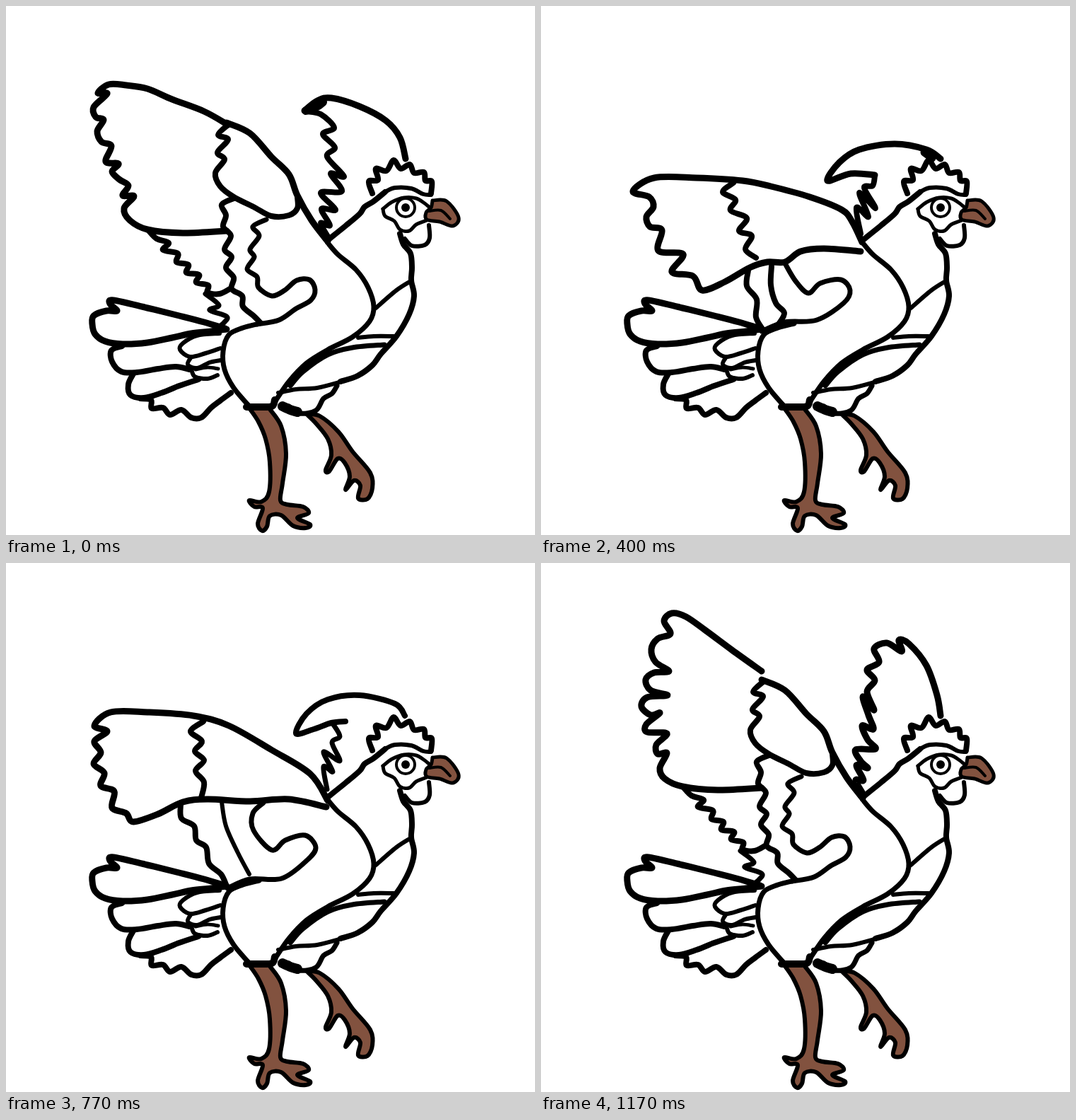
Recreate the animation shown at these times as an HTML page with a canvas. Size 748 by 748 pixels, loop 1.34 s.

```html
<!DOCTYPE html>
<html lang="en">
<head>
<meta charset="utf-8">
<title>Flapping bird</title>
<style>
html, body { margin: 0; width: 100%; height: 100%; overflow: hidden; background: #fff; }
canvas { display: block; width: 100vw; height: 100vh; }
</style>
</head>
<body>
<canvas id="stage" width="748" height="748"></canvas>
<script>
const ctx = document.getElementById('stage').getContext('2d');
const BROWN = '#82523f';

// Smooth curve through a few points
function curve(text) {
  const n = text.trim().split(/[\s,]+/).map(Number);
  const pts = [];
  for (let i = 0; i < n.length; i += 2) pts.push([n[i], n[i + 1]]);
  const path = new Path2D();
  path.moveTo(...pts[0]);
  for (let i = 0; i < pts.length - 1; i++) {
    const a = pts[i], b = pts[i + 1];
    const p = pts[i - 1] || a, q = pts[i + 2] || b;
    path.bezierCurveTo(
      a[0] + (b[0] - p[0]) / 6, a[1] + (b[1] - p[1]) / 6,
      b[0] - (q[0] - a[0]) / 6, b[1] - (q[1] - a[1]) / 6, b[0], b[1]);
  }
  return path;
}

const line = (width, text, fill) => ({ width, path: curve(text), fill });

function draw(parts) {
  for (const { width, path, fill } of parts) {
    if (fill) {
      ctx.fillStyle = fill;
      ctx.fill(path);
    }
    ctx.lineWidth = width;
    ctx.stroke(path);
  }
}

const tail = [
  line(9, '310,456 280,447 245,438 200,427 152,416 147,421 157,431 142,431 124,438 122,450 126,464 140,474 165,478 200,476 235,469 262,463 290,460 312,457'),
  line(8, '164,481 149,487 150,503 163,517 185,518 215,513 240,510 260,514'),
  line(8, '180,520 173,535 176,550 195,554 220,547 245,537 272,528'),
  line(8, '190,555 205,557 206,569 222,568 232,578 248,571 262,582 276,582 290,568 303,558 318,547'),
  line(6, '302,463 270,466 250,477 246,486 260,496 282,491 303,484'),
  line(6, '262,496 257,507 270,512 288,504 303,501'),
  line(6, '262,513 267,524 285,527 299,522'),
  line(5, '268,514 285,511 300,513')
];

const body = [
  line(7, '455,335 470,352 495,373 512,398 520,425 514,446 490,468 455,486 425,505 400,531 380,560'),
  line(7, '358,449 335,455 315,465 307,488 309,514 322,540 345,567'),
  line(10, '340,567 358,567 376,566 380,557'),
  line(8, '455,331 480,311 500,294 507,284 520,276 536,263'),
  line(6, '536,263 550,257 573,258 590,266 601,267'),
  line(8, '557,322 562,337 572,350 574,370 573,388 577,410 570,436 552,467 530,492 518,508 497,523 473,531'),
  line(6, '574,388 552,402 523,427'),
  line(6, '498,469 520,467 548,467'),
  line(7, '402,537 420,517 455,493 490,483 535,479'),
  line(6, '385,547 410,542 440,540 475,531'),
  line(7, '468,537 461,548 449,555 438,572 415,576 400,566'),
  line(14, '391,566 402,571 412,574')
];

const head = [
  line(8, '518,265 513,248 526,246 523,230 538,233 548,218 558,230 571,224 577,236 591,235 593,247 602,248 601,265'),
  line(5, '533,287 546,277 563,271 580,272 592,279 598,284'),
  line(5, '533,287 536,297 549,304 557,316 570,318 580,309 595,303'),
  line(6, '598,310 599,328 592,338 574,339 564,329'),
  line(5, '603,275 623,276 640,299 632,311 613,305 595,302 594,292 601,285 603,275', BROWN),
  line(4, '598,290 615,289 628,301')
];

const legs = [
  line(6, '345,570 357,588 367,612 373,645 372,687 361,701 344,699 351,708 363,710 356,732 362,742 369,736 373,721 389,720 406,735 424,738 430,733 412,724 428,717 420,708 398,705 388,699 391,675 396,633 389,594 373,570', BROWN),
  line(6, '425,577 444,580 470,602 490,630 515,660 518,682 511,697 498,696 501,678 492,671 480,684 486,665 479,646 469,640 457,658 452,656 460,635 455,612 439,591 425,577', BROWN)
];

// Pieces shared by the raised poses
const raised = [
  line(9, '312,165 345,180 375,213 400,238 412,268 432,303 455,333'),
  line(8, '314,168 300,182 314,189 299,207 309,217 296,236 303,255 322,270 350,284 375,297 400,296 412,286 412,270'),
  line(8, '202,318 213,329 230,335 222,345 243,350 241,362 258,366 255,377 273,380 269,391 286,395 285,405 302,407 318,399'),
  line(7, '282,407 301,423 288,430 312,439 308,448 298,456')
];
const layer = line(8, '322,272 305,281 311,296 307,312 318,325 309,344 319,355 311,370 322,384 319,400 334,410 335,425 350,438 360,448');
const arm = line(7, '368,302 349,312 358,325 345,344 351,355 341,372 355,383 357,398 376,410 394,402 411,388 429,387 437,401 431,416 410,428 386,444 355,450');
const lowArm = line(7, '345,364 360,389 378,406 395,392 424,387 437,402 428,420 390,444 345,447 312,460');

const poses = {
  top: {
    far: [line(9, '565,216 560,187 545,145 520,114 506,109 510,125 489,113 471,121 478,140 461,151 472,166 461,182 471,208 455,189 463,215 470,235 454,230 462,250 473,263 445,264 452,280 462,290 446,286 456,307 445,307 455,326')],
    near: [
      line(9, '312,153 270,123 235,97 205,76 185,71 174,82 183,100 165,107 156,122 162,140 181,153 160,155 148,165 155,180 179,187 150,190 142,203 155,215 168,212 149,228 150,239 178,241 163,257 165,270 178,269 168,290 175,305 200,316 250,321 312,318'),
      ...raised, layer, arm]
  },
  high: {
    far: [
      line(9, '565,216 557,186 537,162 500,142 460,130 440,134 422,148'),
      line(12, '424,148 440,142 448,136'),
      line(8, '425,149 445,153 464,172 448,181 465,200 454,213 478,241 459,237 475,262 445,264 466,288 446,287 458,310 445,307 455,326')],
    near: [
      line(9, '314,168 280,149 235,132 200,117 170,112 145,111 130,123 143,124 124,143 127,157 138,161 129,177 135,192 149,198 141,220 159,223 150,234 160,245 173,254 165,268 181,269 167,286 175,303 200,316 250,321 312,318'),
      ...raised, layer, arm]
  },
  tilt: {
    far: [
      line(9, '564,216 546,194 510,178 480,174 445,182 417,207'),
      line(7, '417,207 447,207 467,211 490,206'),
      line(7, '473,211 459,227 467,239 481,243 464,255 475,277 445,262 462,292 446,286 457,312 447,312')],
    near: [
      line(9, '438,303 425,267 410,240 385,207 340,180 270,159 215,150 160,149 115,165 97,184 108,196 94,218 108,233 106,240 126,246 117,267 133,270 156,263 155,251 200,249 250,240 300,227 350,225 388,221'),
      line(8, '270,162 262,175 244,180 250,195 244,214 256,224 259,237'),
      line(8, '298,229 305,245 326,266 360,284 395,293 426,291'),
      line(7, '300,234 298,247 308,267 302,284 302,300'),
      line(8, '166,258 170,276 184,292 210,291 240,294 270,301 305,311'),
      line(8, '182,294 204,309 204,325 220,334 226,350 246,357 245,371 263,382 260,399 274,409 283,430 308,444 312,454'),
      line(8, '365,300 400,296 436,303 453,320 455,334'),
      layer, arm]
  },
  mid: {
    far: [
      line(8, '563,216 563,201 540,185 500,178 460,184 430,205 418,234 438,233 453,225 465,239 464,220 456,207 472,210 491,207'),
      line(7, '465,238 479,243 467,253 472,276 450,269 462,293 451,290 456,315 450,325')],
    near: [
      line(9, '455,336 420,295 385,263 340,227 285,198 240,185 190,179 142,180 130,195 137,206 112,211 118,230 98,244 115,257 97,275 100,290 119,296 112,312 125,328 150,331 185,312 225,298 270,300 330,310 390,323 455,343'),
      line(8, '287,203 264,214 278,231 264,241 271,257 254,268 254,285 265,299'),
      line(8, '225,300 207,309 202,325 215,340 236,349 239,365 261,375 257,395 270,404 275,425 300,442 311,456'),
      line(6, '280,302 289,318 300,352 320,400 345,441'),
      line(7, '378,323 355,339 344,364 351,385 375,406 395,391 420,382 438,401 425,419 390,448 345,447 313,461')]
  },
  fall: {
    far: [
      line(8, '564,216 550,199 500,187 455,193 425,213 410,241 435,235 460,226 480,224'),
      line(7, '462,227 472,245 461,254 472,280 449,267 462,295 449,288 454,320')],
    near: [
      line(9, '455,336 430,298 375,264 315,230 265,216 200,211 148,211 125,230 143,238 125,252 134,268 124,284 139,297 134,315 153,323 150,346 170,354 180,366 215,355 250,338 285,334 345,337 400,334 453,345'),
      line(8, '279,224 261,238 277,252 267,266 280,279 268,294 280,310 276,332'),
      line(8, '247,341 248,361 266,372 269,392 283,402 287,425 304,440 312,457'),
      line(6, '305,338 311,372 328,410 344,440'),
      line(7, '364,339 349,354 350,378 376,406 395,392 423,385 438,402 426,420 390,446 345,447 313,460')]
  },
  low: {
    far: [
      line(9, '565,216 545,203 500,195 450,203 422,221 405,247 438,237 472,239'),
      line(11, '542,207 553,215'),
      line(8, '472,240 469,254 457,257 473,286 450,264 463,298 446,285 452,322')],
    near: [
      line(9, '454,334 440,305 425,288 380,270 325,255 285,247 220,243 160,243 130,262 153,270 159,284 149,298 154,312 171,317 166,346 201,351 185,376 215,382 228,402 260,390 295,370 320,362 345,362 367,347 400,343 452,347'),
      line(8, '272,250 257,263 275,274 268,289 291,300 280,318 298,325 289,344 304,356'),
      line(8, '293,374 291,396 305,415 304,440 314,458'),
      line(8, '326,368 325,395 332,420 344,434 336,450'),
      lowArm]
  },
  bottom: {
    far: [
      line(9, '565,216 540,210 495,205 450,216 420,236 405,262 440,251 472,252'),
      line(8, '472,252 458,264 471,286 450,272 462,299 447,290 452,322')],
    near: [
      line(9, '454,334 438,316 415,303 370,291 315,279 270,280 210,288 155,302 136,324 158,328 156,349 172,352 167,373 190,376 185,397 210,397 212,418 240,413 275,398 310,377 345,365 368,350 400,344 452,347', '#fff'),
      line(8, '275,283 261,296 280,307 273,323 294,332 284,350 305,357 303,378'),
      line(8, '300,387 297,406 307,424 306,444 314,458'),
      line(8, '327,372 326,396 333,420 345,435 336,450'),
      lowArm]
  }
};

const LOOP = 1340;
const steps = [
  [0, 'high'], [100, 'tilt'], [200, 'mid'], [300, 'fall'], [400, 'low'], [500, 'bottom'],
  [670, 'low'], [770, 'fall'], [870, 'mid'], [970, 'tilt'], [1070, 'high'], [1170, 'top']
];

function render(time) {
  const t = time % LOOP;
  const pose = poses[steps.filter(s => s[0] <= t).pop()[1]];
  ctx.fillStyle = '#fff';
  ctx.fillRect(0, 0, 748, 748);
  ctx.strokeStyle = '#000';
  ctx.lineCap = ctx.lineJoin = 'round';
  draw(pose.far);
  draw(tail);
  draw(legs);
  draw(body);
  draw(head);
  ctx.lineWidth = 4;
  ctx.beginPath();
  ctx.arc(565, 285, 13, 0, 7);
  ctx.stroke();
  ctx.fillStyle = '#000';
  ctx.beginPath();
  ctx.arc(565, 285, 6, 0, 7);
  ctx.fill();
  draw(pose.near);
}

const start = performance.now();
function tick() {
  render(performance.now() - start);
  requestAnimationFrame(tick);
}
tick();
</script>
</body>
</html>
```
